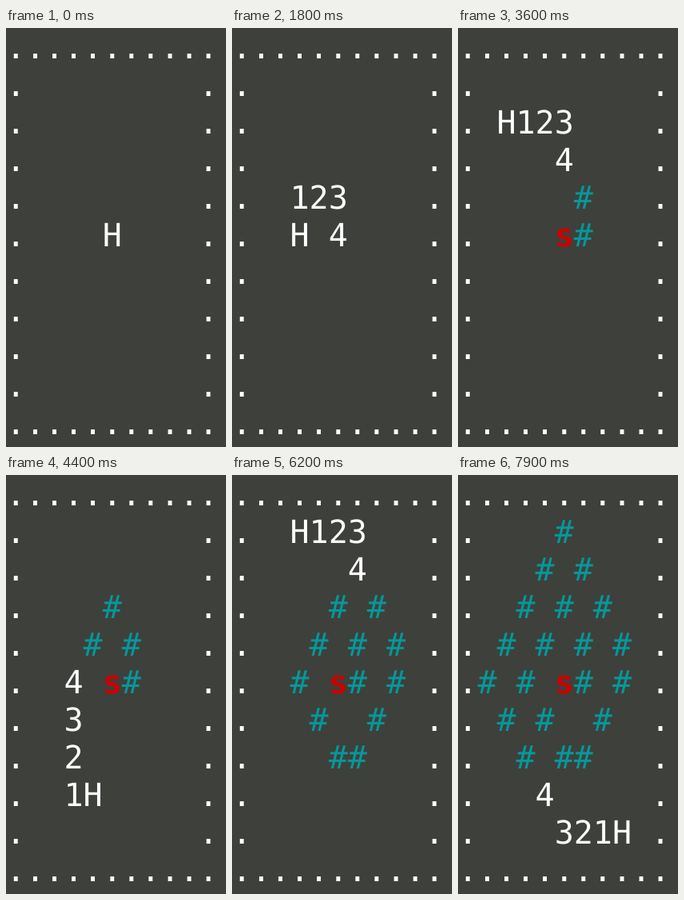
Recreate the animation shown at these times as an HTML page. Size 275 by 524 pixels, loop 8000 ms.

```html
<!DOCTYPE html>
<html lang="en">
<head>
<meta charset="utf-8">
<title>Rope walk</title>
<style>
  html, body { margin: 0; width: 100%; height: 100%; overflow: hidden; background: #3e403c; }
  svg { display: block; width: 275px; height: 524px; }
  text {
    font: 40px "DejaVu Sans Mono", monospace;
    text-rendering: geometricPrecision;
    fill: #fff;
  }
  .trail { fill: #06989a; }
  .start { fill: #c00; font-weight: bold; }
</style>
</head>
<body>
<svg id="stage" viewBox="0 0 275 524"></svg>
<script>
const SIZE = 11, STEP_MS = 100, STEPS = 80, KNOTS = 5;
const CELL_W = 24.08, CELL_H = 47, LEFT = 0.3, BASELINE = 38;
const START = [5, 5];
const HEADINGS = [[1, 0], [0, -1], [-1, 0], [0, 1]]; // right, up, left, down

const stage = document.getElementById("stage");
const cells = Array.from({ length: SIZE * SIZE }, (_, i) => {
  const cell = document.createElementNS("http://www.w3.org/2000/svg", "text");
  cell.setAttribute("x", LEFT + CELL_W * (i % SIZE));
  cell.setAttribute("y", BASELINE + CELL_H * Math.floor(i / SIZE));
  return stage.appendChild(cell);
});

const index = ([x, y]) => y * SIZE + x;

// Square spiral: leg lengths run 1, 1, 2, 2, 3, 3, ...
function spiralMoves(count) {
  const moves = [];
  for (let leg = 0; moves.length < count; leg++) {
    const length = 1 + (leg >> 1);
    for (let i = 0; i < length; i++) moves.push(HEADINGS[leg % 4]);
  }
  return moves.slice(0, count);
}

// A knot moves one cell towards its leader once they stop touching.
function follow(knot, leader) {
  const dx = leader[0] - knot[0], dy = leader[1] - knot[1];
  if (Math.max(Math.abs(dx), Math.abs(dy)) < 2) return knot;
  return [knot[0] + Math.sign(dx), knot[1] + Math.sign(dy)];
}

function buildPoses() {
  let rope = Array(KNOTS).fill(START);
  const poses = [rope];
  for (const [dx, dy] of spiralMoves(STEPS - 1)) {
    const next = [[rope[0][0] + dx, rope[0][1] + dy]];
    for (let k = 1; k < KNOTS; k++) next.push(follow(rope[k], next[k - 1]));
    poses.push(rope = next);
  }
  return poses;
}

const poses = buildPoses();

function draw(step) {
  const grid = Array(SIZE * SIZE).fill("");
  for (let i = 0; i < SIZE; i++) {
    for (const edge of [0, SIZE - 1]) {
      grid[index([i, edge])] = grid[index([edge, i])] = ".";
    }
  }
  for (let i = 0; i <= step; i++) grid[index(poses[i][KNOTS - 1])] = "#";
  grid[index(START)] = "s";
  for (let k = KNOTS - 1; k >= 0; k--) grid[index(poses[step][k])] = k ? String(k) : "H";

  grid.forEach((mark, i) => {
    cells[i].textContent = mark;
    cells[i].setAttribute("class", mark === "#" ? "trail" : mark === "s" ? "start" : "");
  });
}

const began = performance.now();
let shown = -1;

function tick() {
  const step = Math.floor((performance.now() - began) / STEP_MS) % STEPS;
  if (step !== shown) draw(shown = step);
  requestAnimationFrame(tick);
}
tick();
</script>
</body>
</html>
```
